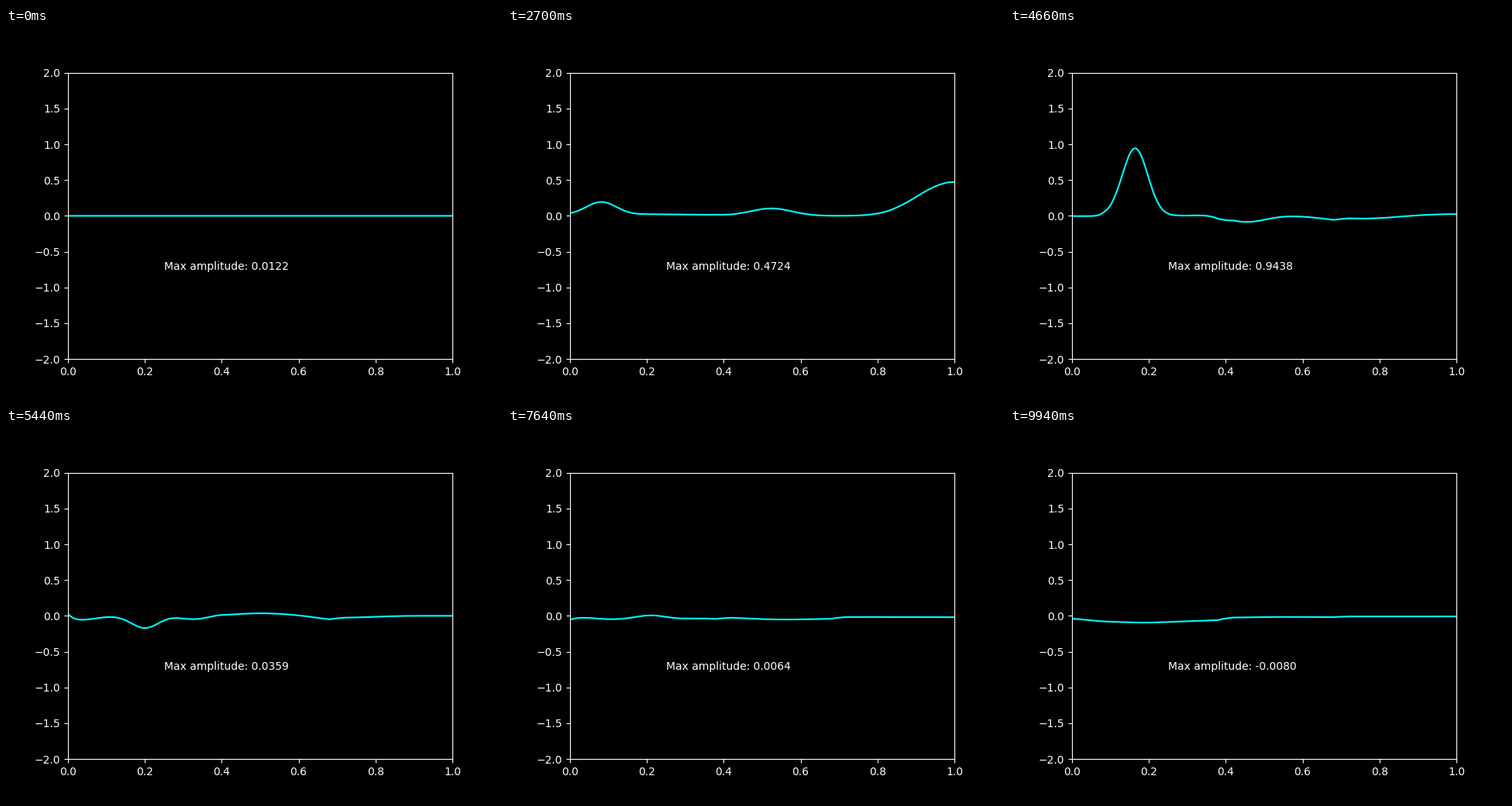
These frames come from a looping animation (640 px wide and 480 px high, 9960 ms). A matplotlib script:

```python
import numpy as np
import matplotlib.pyplot as plt
from matplotlib.animation import FuncAnimation

FRAMES = 498
INTERVAL = 20
STEPS_PER_FRAME = 6

DX, DT = 0.0025, 0.001
PULSE_TIME, PULSE_WIDTH = 0.09895, 1 / 30
SOURCE_END = 0.6
EDGE_SPRING = 2.2

x = np.linspace(0, 1, 401)
# Three media joined by short linear ramps.
speed = np.interp(x, [0.38, 0.42, 0.68, 0.72], [1, 1.5, 1.5, 2.25])


def source(t):
    pulse = np.exp(-0.5 * ((t - PULSE_TIME) / PULSE_WIDTH) ** 2)
    return pulse + 0.06 * max(0, t - 0.22)


def simulate():
    """Solve u_tt = (c^2 u)_xx and return one row per frame."""
    old, u = np.zeros_like(x), np.zeros_like(x)
    u[0] = source(0)
    courant = speed[0] * DT / DX
    mur = (courant - 1) / (courant + 1)
    rows = [u.copy()]
    for step in range(1, (FRAMES - 1) * STEPS_PER_FRAME + 1):
        w = speed ** 2 * u
        bend = np.zeros_like(u)
        bend[1:-1] = w[2:] - 2 * w[1:-1] + w[:-2]
        bend[-1] = 2 * (w[-2] - w[-1])
        new = 2 * u - old + (DT / DX) ** 2 * bend
        t = step * DT
        if t < SOURCE_END:
            new[0] = source(t)
        else:
            # Absorbing edge with a weak restoring pull.
            new[0] = u[1] + mur * (new[1] - u[0]) - EDGE_SPRING * DT * u[0]
        old, u = u, new
        if step % STEPS_PER_FRAME == 0:
            rows.append(u.copy())
    return rows


history = simulate()

plt.style.use("dark_background")
fig, ax = plt.subplots(figsize=(6.4, 4.8), dpi=100)
ax.set_xlim(0, 1)
ax.set_ylim(-2, 2)
line, = ax.plot(x, history[0], color="cyan", lw=1.5)
label = ax.text(0.25, -0.75, "", color="white", fontsize=10)


def update(i):
    line.set_ydata(history[i])
    label.set_text(f"Max amplitude: {history[i].max():.4f}")
    return line, label


anim = FuncAnimation(fig, update, frames=FRAMES, interval=INTERVAL,
                     repeat=True, repeat_delay=0)
plt.show()
```
